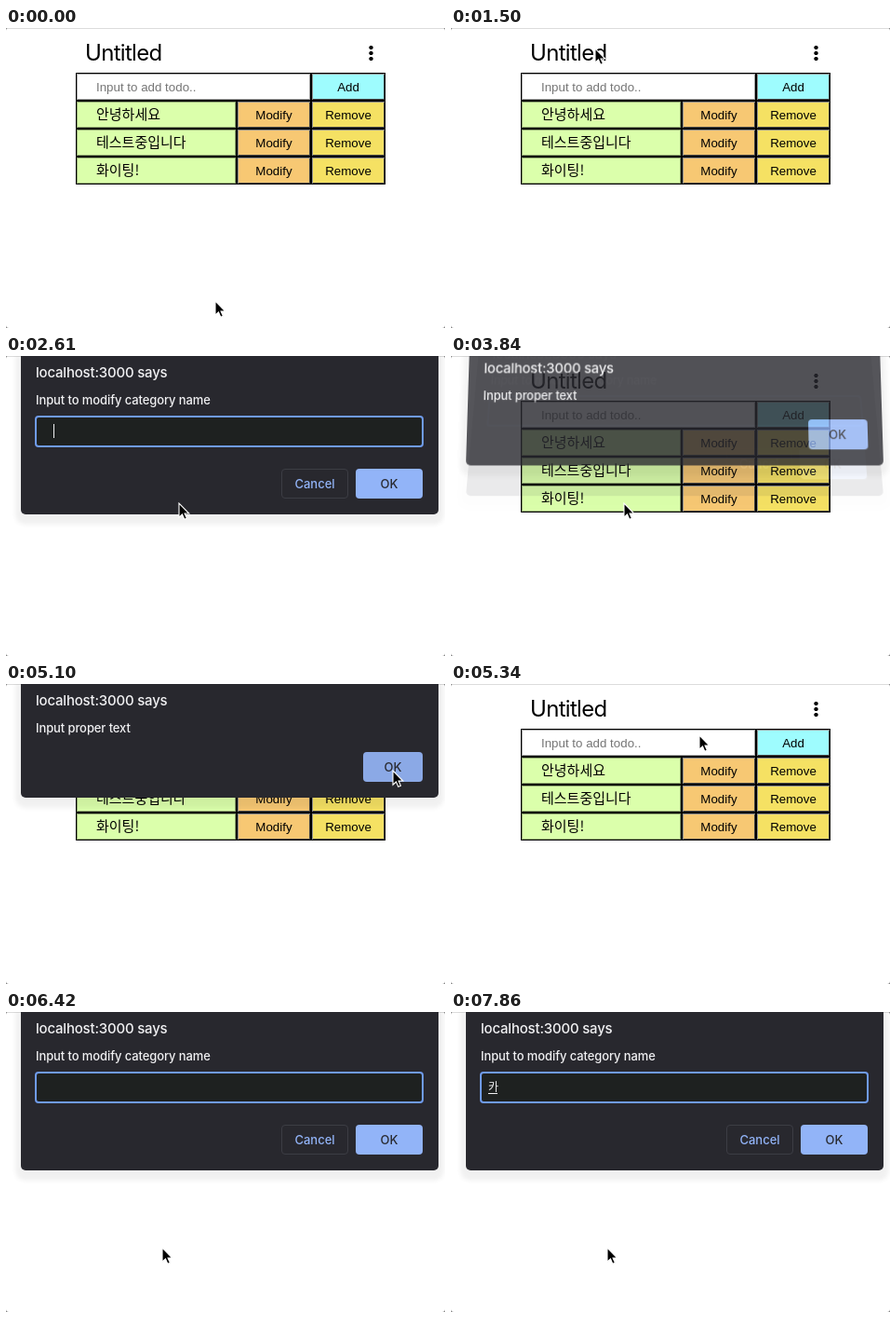
An HTML page that plays this animation: 472x322 px, repeating every 8000 ms.

```html
<!DOCTYPE html>
<html lang="ko">
<head>
<meta charset="utf-8">
<title>Todo list</title>
<style>
  html, body { margin: 0; width: 100%; height: 100%; overflow: hidden; background: #777; }
  #stage { position: absolute; left: 0; top: 0; width: 472px; height: 322px; overflow: hidden;
    background: #fff; border-radius: 3px; }
  #stage div, #stage svg { position: absolute; box-sizing: border-box; white-space: pre; }
  #edge { left: 0; top: 0; width: 472px; height: 1px; background: #dcdcdc; }
  #title { left: 85px; top: 11px; font: 24px/31px Inter, sans-serif; letter-spacing: -.7px; color: #000; }
  #dots { left: 390px; top: 18px; width: 5px; height: 18px;
    background: radial-gradient(circle, #000 1.8px, transparent 2.5px) 0 0 / 5px 6px; }
  .cell { height: 30px; border: 1px solid #000; box-shadow: inset 0 0 0 1px rgba(0, 0, 0, .35);
    font: 13.333px/29px "Liberation Sans", Arial, sans-serif; }
  .field { left: 75px; width: 253px; padding-left: 21px; color: #757575; background: #fff; }
  .item { left: 75px; width: 173px; padding-left: 21px; background: #dbffab;
    font: 15px/25px "Noto Sans CJK KR", "Noto Sans CJK", sans-serif; }
  .btn { text-align: center; width: 80px; box-shadow: inset 1px 1px #8c8c8c, inset -1px -1px #444; }
  .modify { left: 248px; background: #f7c873; }
  .side { left: 328px; }
  .add { background: #9efcfe; }
  .remove { background: #f5e163; }
  .dlg { left: 15.5px; top: 0; width: 449px; background: #28282e; border-radius: 0 0 5px 5px;
    transform-origin: 50% 100%; color: #f1f1f3; font: 500 13px/20px Inter, sans-serif;
    box-shadow: 0 5px 5px 6px rgba(0, 0, 0, .06); }
  .host { left: 16.5px; top: 8px; font-size: 15px; letter-spacing: -.2px; }
  .msg { left: 16.5px; top: 37px; letter-spacing: -.1px; }
  .key { height: 32px; border-radius: 4px; text-align: center; line-height: 32px; }
  .ok { right: 16.5px; background: #92b4f8; color: #292a30; }
  .cancel { left: 280.5px; top: 121px; width: 72px; border: 1px solid #3c3d44; line-height: 30px; color: #92b4f8; }
  .entry { left: 15.5px; top: 64px; width: 418px; height: 34px; border: 2px solid #6f9bec;
    border-radius: 4px; background: #1e2120; }
  #typed { left: 24.5px; top: 71px; font: 12px/18px "Noto Sans CJK KR", "Noto Sans CJK", sans-serif; }
  #rule { left: 24.5px; top: 87px; width: 10px; height: 1px; background: #f1f1f3; }
  #caret { top: 73px; width: 1px; height: 15px; background: #f1f1f3; }
  #cursor { left: -2px; top: -2px; width: 16px; height: 22px; overflow: visible; }
</style>
</head>
<body>
<div id="stage">
  <div id="edge"></div>
  <div id="title">Untitled</div>
  <div id="dots"></div>
  <div id="list"></div>

  <div class="dlg" id="prompt" style="height:169.5px">
    <div class="host">localhost:3000 says</div>
    <div class="msg">Input to modify category name</div>
    <div class="entry"></div>
    <div id="typed"></div>
    <div id="rule"></div>
    <div id="caret"></div>
    <div class="key cancel">Cancel</div>
    <div class="key ok" style="top:121px;width:72px">OK</div>
  </div>

  <div class="dlg" id="alert" style="height:121.5px">
    <div class="host">localhost:3000 says</div>
    <div class="msg">Input proper text</div>
    <div class="key ok" id="confirm" style="top:73px;width:64px">OK</div>
  </div>

  <svg id="cursor" viewBox="-2 -2 16 22">
    <path d="M0 0V15.2L3.5 12L5.8 17.3L8.4 16.2L6.1 11H10.8Z" fill="#000" stroke="#fff" stroke-width="1.1"/>
  </svg>
</div>

<script>
const $ = id => document.getElementById(id);
const LOOP = 8000, STEP = 30, SWING = 130, BLINK = 450;

// moments of the story
const OPEN = 1510, SPACES = 2310, KEY = 150, COUNT = 6, ENTER = 3752;
const PRESS = 5070, CLOSE = 5170, REOPEN = 5828, TYPE = 7350, JOIN = 7410;

// page rows
const cell = (cls, row, text) =>
  `<div class="cell ${cls}" style="top:${48 + 30 * row}px">${text}</div>`;
$('list').innerHTML =
  cell('field', 0, 'Input to add todo..') + cell('btn side add', 0, 'Add') +
  ['안녕하세요', '테스트중입니다', '화이팅!'].map((name, i) =>
    cell('item', i + 1, name) +
    cell('btn modify', i + 1, 'Modify') +
    cell('btn side remove', i + 1, 'Remove')).join('');

const clamp = v => Math.min(1, Math.max(0, v));
const ease = p => p * p * (3 - 2 * p);

// pointer moves: start, end, and where to
const moves = [
  { from: 0, to: 240, x: 178, y: 226 },
  { from: 450, to: 1080, x: 155, y: 22 },
  { from: 1830, to: 1920, x: 186, y: 158 },
  { from: 4650, to: 5010, x: 416, y: 93 },
  { from: 5190, to: 5490, x: 118, y: 17 },
  { from: 5910, to: 6150, x: 168, y: 253 }
];

function pointAt(t) {
  let x = 225, y = 293;
  for (const m of moves) {
    const e = ease(clamp((t - m.from) / (m.to - m.from)));
    x += (m.x - x) * e;
    y += (m.y - y) * e;
  }
  return [x, y];
}

function opacity(t, open, close) {
  const rise = 1 - (1 - clamp((t - open) / SWING)) ** 1.4;
  return rise * (1 - clamp((t - close) / SWING)) ** 3;
}

// the sheet swings down: lifted and narrower at the top while faint
function place(el, a) {
  const tilt = .072 * (1 - a), pull = tilt / (el.offsetHeight - 17);
  el.style.opacity = a;
  el.style.visibility = a > 0 ? 'visible' : 'hidden';
  el.style.transform = a < 1
    ? `translateY(${-22 * (1 - a)}px) matrix3d(1,0,0,0, 0,${1 + tilt},0,${(-pull).toFixed(7)}, 0,0,1,0, 0,0,0,1)`
    : 'none';
}

// the blink restarts with every key
function caretAt(t) {
  const spaces = t < REOPEN ? Math.max(0, Math.min(COUNT, Math.floor((t - SPACES) / KEY) + 1)) : 0;
  const last = t >= JOIN ? JOIN : t >= TYPE ? TYPE
    : t >= REOPEN ? REOPEN + SWING
    : spaces ? SPACES + KEY * (spaces - 1) : OPEN + SWING;
  return { x: t >= TYPE ? 51 : 40 + 3.5 * spaces, on: t < last || Math.floor((t - last) / BLINK) % 2 === 0 };
}

function render(t) {
  place($('prompt'), t < REOPEN ? opacity(t, OPEN, ENTER + 18) : opacity(t, REOPEN, LOOP));
  place($('alert'), opacity(t, ENTER, CLOSE));
  $('confirm').style.background = t >= PRESS ? '#8ba9e6' : '';

  const caret = caretAt(t);
  $('caret').style.left = caret.x - 15.5 + 'px';
  $('caret').style.opacity = caret.on ? 1 : 0;
  $('typed').textContent = t < TYPE ? '' : t < JOIN ? 'ㅋ' : '카';
  $('rule').style.opacity = t < TYPE ? 0 : 1;

  const [x, y] = pointAt(t);
  $('cursor').style.transform = `translate(${x}px,${y}px)`;
}

const start = performance.now();
function tick(now) {
  const t = Math.max(0, now - start) % LOOP;
  render(Math.floor(t / STEP) * STEP);
  requestAnimationFrame(tick);
}
render(0);
requestAnimationFrame(tick);
</script>
</body>
</html>
```
